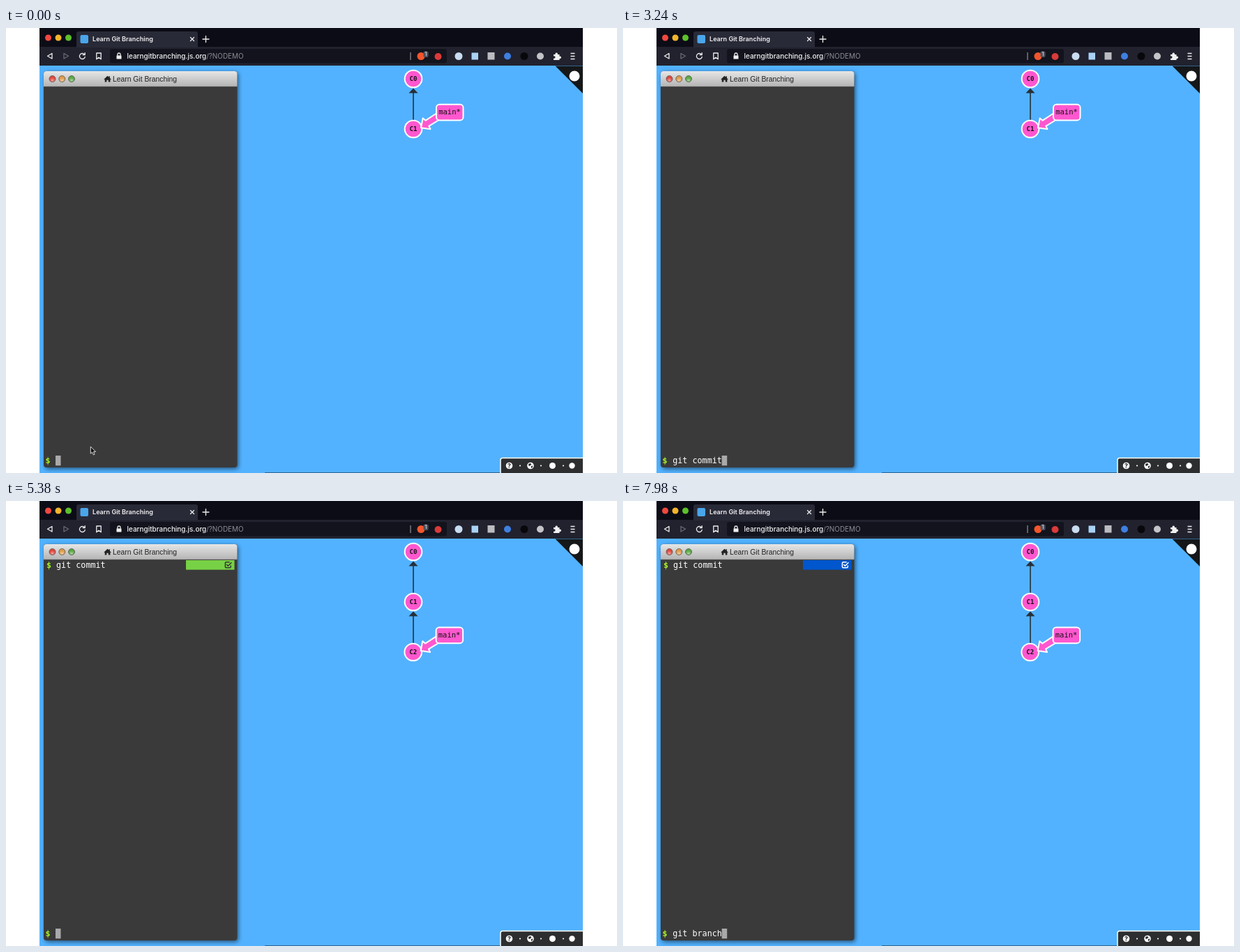
An HTML page that plays this animation: 876x639 px, repeating every 8 s.

```html
<!DOCTYPE html>
<html lang="en">
<head>
<meta charset="utf-8">
<title>Learn Git Branching</title>
<style>
  html, body { margin: 0; width: 100%; height: 100%; overflow: hidden; background: #fff; }
  svg { display: block; width: 100vw; height: 100vh; }
  text { white-space: pre; }
  .ui { font-family: Inter, sans-serif; }
  .mono { font: 11.74px "DejaVu Sans Mono", monospace; fill: #fff; }
  .prompt { font-weight: bold; fill: #a6f22a; }
  .node circle { fill: #ff57cf; stroke: #fff; stroke-width: 2; }
  .node text { font: bold 9px "DejaVu Sans Mono", monospace; text-anchor: middle; fill: #111; }
  .edge { fill: #272f38; stroke: #272f38; }
  .line { fill: none; stroke: #eee; stroke-width: 1.3; stroke-linejoin: round; stroke-linecap: round; }
</style>
</head>
<body>
<svg viewBox="0 0 876 639" preserveAspectRatio="none">
  <defs>
    <linearGradient id="bar" x2="0" y2="1">
      <stop stop-color="#e6e6e6"/><stop offset="1" stop-color="#b4b4b4"/>
    </linearGradient>
    <radialGradient id="shine" cy=".8">
      <stop stop-color="#fff" stop-opacity=".5"/><stop offset="1" stop-color="#fff" stop-opacity="0"/>
    </radialGradient>
    <filter id="blur" x="-10%" y="-10%" width="120%" height="120%"><feGaussianBlur stdDeviation="3"/></filter>
    <clipPath id="page"><rect x="48" y="54" width="779" height="585"/></clipPath>
  </defs>

  <!-- browser chrome -->
  <rect x="48" width="779" height="28" fill="#0c0c17"/>
  <rect x="48" y="27" width="779" height="28" fill="#21222e"/>
  <path d="M101 28V8q0-3 3-3h168q3 0 3 3V28z" fill="#292a37"/>
  <circle cx="60.500" cy="14" r="4.500" fill="#f1483f"/>
  <circle cx="75" cy="14" r="4.500" fill="#f4b52a"/>
  <circle cx="89.500" cy="14" r="4.500" fill="#5dc02b"/>
  <rect x="106.500" y="10" width="11.500" height="12" rx="2" fill="#4aa5ea"/>
  <text class="ui" x="124" y="19.300" font-size="9.100" font-weight="600" fill="#f2f2f4">Learn Git Branching</text>
  <path class="line" d="M264.500 13.500l5 5m0-5l-5 5M282 16h9m-4.500-4.500v9"/>
  <rect x="149" y="30" width="483" height="20.500" rx="3" fill="#12131c"/>
  <path class="line" d="M66 36.500v7.500l-6.500-3.700z"/>
  <path class="line" d="M83 36.500v7.500l6.500-3.700z" stroke-opacity=".35"/>
  <path class="line" d="M112.500 38a4 4 0 1 0 .8 3.300M113.200 35.600v3h-3" stroke-width="1.500"/>
  <path class="line" d="M129.800 36h6.400v8.800l-3.200-2.600-3.200 2.600z"/>
  <path d="M158.500 39.500h7v5h-7z" fill="#eee"/>
  <path class="line" d="M160 39.500v-1.500a2 2 0 0 1 4 0v1.500" stroke-width="1.200"/>
  <text class="ui" x="173.500" y="43.800" font-size="9.950" font-weight="500" fill="#f4f4f6">learngitbranching.js.org<tspan fill="#8b8c95" font-weight="400">/?NODEMO</tspan></text>
  <path d="M580 35v11" stroke="#aaa"/>
  <circle cx="595" cy="40.500" r="5.500" fill="#f4552c"/>
  <rect x="598.500" y="33.500" width="7" height="8.500" rx="2" fill="#50535f"/>
  <text class="ui" x="600.400" y="40.300" font-size="7" fill="#fff">1</text>
  <circle cx="619.500" cy="41" r="5" fill="#d93a3a"/>
  <circle cx="649" cy="40.500" r="5.500" fill="#c9dcf0"/>
  <rect x="667.500" y="35.500" width="9.500" height="10" fill="#a9d2f5"/>
  <rect x="690.500" y="35" width="10" height="10.500" fill="#bbbcc0"/>
  <circle cx="719" cy="40.500" r="5" fill="#3f7fe0"/>
  <circle cx="743" cy="40.500" r="5.500" fill="#08080c"/>
  <circle cx="766" cy="40.500" r="5" fill="#c4c4c8"/>
  <path d="M785 38h2.500a1.800 1.800 0 1 1 3.400 0h2.600v2.700a1.800 1.800 0 1 1 0 3.300v2h-8.500v-2.500a1.700 1.700 0 1 0 0-3z" fill="#f2f2f2"/>
  <path d="M809.500 36.500h6m-6 4h6m-6 4h6" stroke="#eee" stroke-width="1.300"/>

  <!-- page -->
  <g clip-path="url(#page)">
    <rect x="48" y="54" width="779" height="585" fill="#52b2ff"/>
    <rect x="371" y="638" width="338" height="1" fill="#2d6594"/>
    <path d="M787.500 54.500H827V94z" fill="#151719"/>
    <circle cx="815" cy="69" r="7.500" fill="#fff"/>

    <rect x="709" y="617.500" width="125" height="30" rx="3" fill="#2d2e30" stroke="#fff" stroke-width="1.500"/>
    <g fill="#fff">
      <circle cx="721.500" cy="628.500" r="4.800"/>
      <circle cx="752" cy="628.500" r="4.800"/>
      <circle cx="783.500" cy="628.500" r="4.500"/>
      <circle cx="811.500" cy="628.500" r="4.200"/>
      <circle cx="737" cy="628.500" r="1.100"/><circle cx="767" cy="628.500" r="1.100"/><circle cx="799" cy="628.500" r="1.100"/>
    </g>
    <text class="ui" x="721.500" y="631.600" font-size="8.500" font-weight="800" text-anchor="middle" fill="#2d2e30">?</text>
    <path d="M749 626l3-1 1.500 1.500-2 2-2 .5zM753 629l2.500-.5-1 3-1.500.5z" fill="#2d2e30"/>

    <g class="edge">
      <path d="M584 92V133" stroke-width="1.600"/><path d="M584 86.500l6.500 7h-13z" stroke="none"/>
    </g>
    <g id="edge" class="edge">
      <path id="stem" stroke-width="1.600"/><path id="head" stroke="none"/>
    </g>
    <g class="node"><circle cx="584" cy="73" r="12.300"/><text x="584" y="76.300">C0</text></g>
    <g class="node"><circle cx="584" cy="145" r="12.300"/><text x="584" y="148.300">C1</text></g>
    <g class="node" id="born"><circle r="12.300"/><text y="3.300">C2</text></g>
    <g id="label" fill="#ff57cf" stroke="#fff" stroke-width="2" stroke-linejoin="round">
      <path d="M595 143.300L597.700 129.500 601.500 132.800 616.500 123 621.500 131.500 606.300 140.800 608.500 145.200z"/>
      <rect x="617" y="109.800" width="38.500" height="22.600" rx="4.500"/>
      <text x="636" y="124.200" stroke="none" text-anchor="middle" style="font:10.500px 'DejaVu Sans Mono',monospace;fill:#111">main*</text>
    </g>

    <!-- terminal -->
    <rect x="56" y="64" width="277" height="569" rx="4" opacity=".55" filter="url(#blur)"/>
    <rect x="54" y="62" width="277.500" height="569" rx="4" fill="#3a3a3a"/>
    <path d="M54 84V66q0-4 4-4H327.500q4 0 4 4V84z" fill="url(#bar)"/>
    <path d="M54 84.200H331.500" stroke="#666" stroke-width=".6"/>
    <g id="lamps" stroke-width=".8"></g>
    <path d="M140.500 73.500l5-4.700 2 1.800v-1.300h1.400v2.700l1.800 1.500-.7.700-.6-.5v3.800h-2.600v-2.800h-2.500v2.800h-2.600v-3.800l-.6.500z" fill="#222"/>
    <text x="153" y="76.900" style="font:10.350px 'Liberation Sans',Arial,sans-serif;fill:#222">Learn Git Branching</text>

    <g id="row">
      <text class="mono prompt" x="58" y="95.700">$</text>
      <text class="mono" x="72" y="95.700">git commit</text>
      <rect id="status" x="258" y="85" width="69.500" height="13.700"/>
      <g id="icons" fill="none" stroke-width="1.500" stroke-linejoin="round">
        <rect x="278" y="87.400" width="8.200" height="8" rx="1.500"/>
        <path d="M297 94.500v-5.500m-2 2l2-2 2 2M299.500 88.500h4.500v5.500m-2-2l2 2 2-2M297 94.500h4.500"/>
        <path d="M322.300 92.500v2q0 1.200-1.200 1.200h-5.400q-1.300 0-1.300-1.300v-5.300q0-1.300 1.300-1.300h5M316.200 91l2.200 2.200 5-5"/>
      </g>
    </g>

    <text class="mono prompt" x="56.500" y="625.400">$</text>
    <text id="input" class="mono" x="71.200" y="625.400"></text>
    <rect id="caret" y="614" width="7.500" height="14.300" fill="#a9a9a9"/>
    <path id="mouse" d="M121.300 601v10.200l2.300-2.100 1.700 3.800 1.800-.8-1.700-3.700h3.100z" fill="#111" stroke="#eee" stroke-width=".9"/>
  </g>
</svg>
<script>
const LOOP = 8000, CHAR = 7.07, KEY = 138;
const TYPE1 = 1250, ENTER = 3900, PROCESS = 4300, BIRTH = 4420, DONE = 5340, TYPE2 = 6690;
const YELLOW = [235, 235, 36], GREEN = [127, 217, 60], BLUE = [0, 86, 205];
const DARK = [38, 42, 38], WHITE = [255, 255, 255];
const $ = id => document.getElementById(id);

[["#e0483e", 66.5], ["#dd9a4a", 80.3], ["#5aa843", 94]].forEach(([c, x]) => {
  $("lamps").innerHTML += `<circle cx="${x}" cy="73" r="4.500" fill="${c}" stroke="#555"/>` +
    `<circle cx="${x}" cy="73" r="4" fill="url(#shine)"/>`;
});

const progress = (t, start, span) => Math.min(1, Math.max(0, (t - start) / span));
const easeInOut = p => p * p * (3 - 2 * p);
const easeOut = p => 1 - (1 - p) ** 2.3;
const mix = (a, b, p) => a.map((v, i) => v + (b[i] - v) * p);
const rgb = c => `rgb(${c.map(Math.round)})`;

function bounce(p) {
  const s = 7.5625, l = 2.75;
  if (p < 1 / l) return s * p * p;
  if (p < 2 / l) return s * (p - 1.5 / l) ** 2 + 0.75;
  if (p < 2.5 / l) return s * (p - 2.25 / l) ** 2 + 0.9375;
  return s * (p - 2.625 / l) ** 2 + 0.984375;
}

const typed = (text, t, start) =>
  text.slice(0, Math.max(0, Math.floor((t - start) / KEY) + 1));

function drawTerminal(t) {
  const text = t < ENTER ? typed("git commit", t, TYPE1) : typed("git branch", t, TYPE2);
  $("input").textContent = text;
  $("caret").setAttribute("x", 71 + CHAR * text.length);
  $("mouse").style.display = t < TYPE1 ? "" : "none";

  $("row").style.display = t < ENTER ? "none" : "";
  const done = easeOut(progress(t, DONE, 1500));
  const busy = mix(YELLOW, GREEN, easeOut(progress(t, PROCESS, 1000)));
  $("status").setAttribute("fill", rgb(mix(busy, BLUE, done)));
  $("icons").setAttribute("stroke", rgb(mix(DARK, WHITE, done)));
  const state = t < PROCESS ? 0 : t < DONE ? 1 : 2;
  [...$("icons").children].forEach((icon, i) => {
    icon.style.display = i === state ? "" : "none";
  });
}

function drawGraph(t) {
  const move = easeInOut(progress(t, BIRTH, 400));
  const drop = bounce(progress(t, BIRTH, 800));
  $("born").style.display = t < BIRTH ? "none" : "";
  $("born").setAttribute("transform", `translate(${584 - 0.3 * drop} ${145 + 72 * drop})`);
  $("label").setAttribute("transform", `translate(${-0.4 * move} ${71.8 * move})`);

  const tip = 145 + 13.5 * move, tail = 145 + 60 * move;
  $("edge").setAttribute("opacity", move);
  $("stem").setAttribute("d", `M584 ${Math.min(tip + 5, tail)}V${tail}`);
  $("head").setAttribute("d", `M584 ${tip}l6.5 7h-13z`);
}

const origin = performance.now();
function frame() {
  const t = (performance.now() - origin) % LOOP;
  drawTerminal(t);
  drawGraph(t);
  requestAnimationFrame(frame);
}
frame();
</script>
</body>
</html>
```
